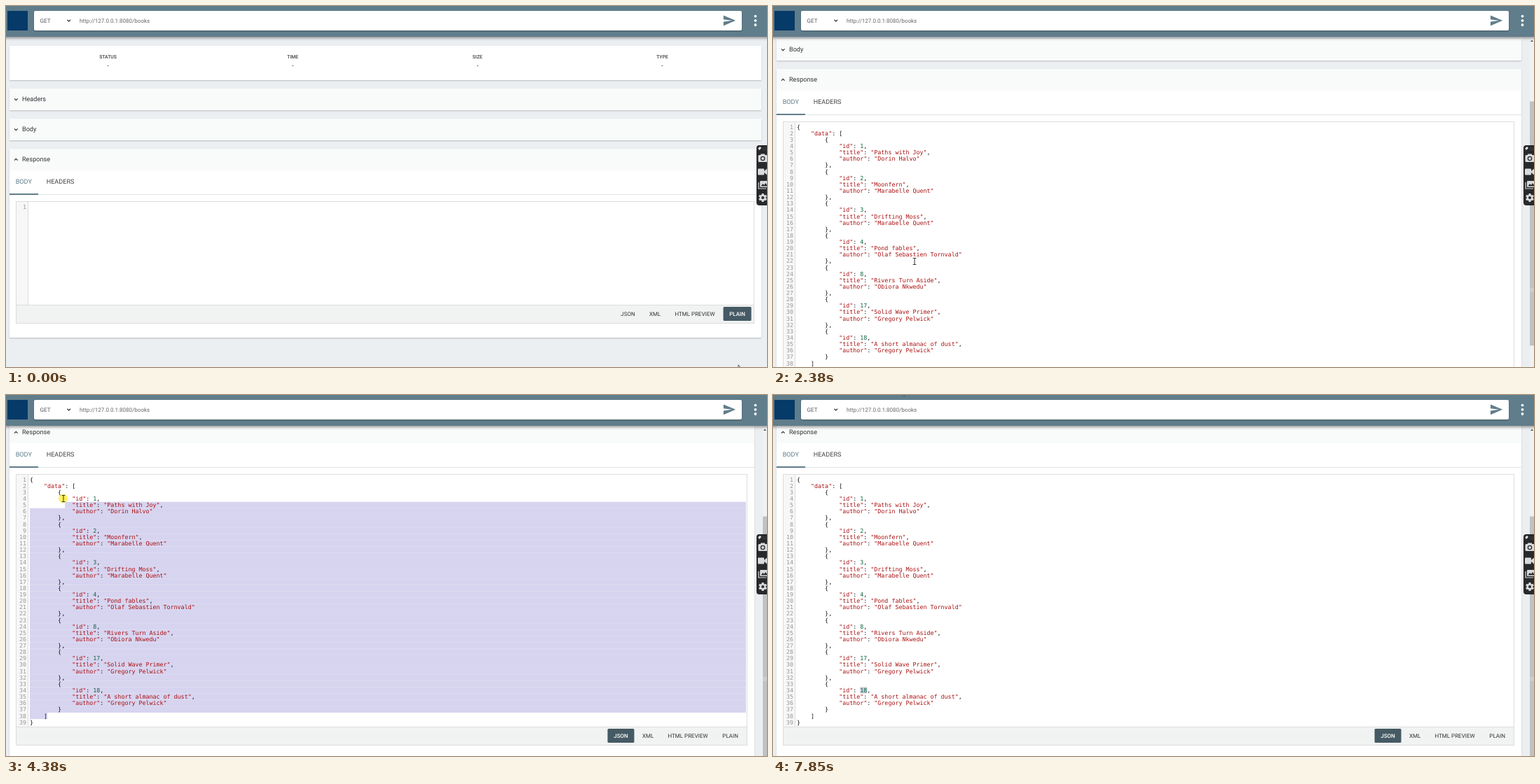
An HTML page with a canvas that plays this animation: 1086x516 px, repeating every 8 s.

```html
<!DOCTYPE html>
<html lang="en">
<head>
<meta charset="utf-8">
<title>REST client</title>
<style>
html, body { margin: 0; width: 100%; height: 100%; overflow: hidden; background: #eceff1; }
canvas { display: block; width: 1086px; height: 516px; }
</style>
</head>
<body>
<canvas id="stage" width="1086" height="516"></canvas>
<script>
const ctx = document.getElementById('stage').getContext('2d');
const LOOP = 8000;
const UI = 'Roboto, sans-serif';
const MONO = '8.33px "DejaVu Sans Mono", monospace';
const SLATE = '#607d8b';
const CODE_X = 34, CHAR = 5.015, ROW = 9.13, ROW_Y = 286.7;

const book = (id, title, author) => ({ id, title, author });
const lines = JSON.stringify({ data: [
  book(1, 'Paths with Joy', 'Dorin Halvo'),
  book(2, 'Moonfern', 'Marabelle Quent'),
  book(3, 'Drifting Moss', 'Marabelle Quent'),
  book(4, 'Pond fables', 'Olaf Sebastien Tornvald'),
  book(8, 'Rivers Turn Aside', 'Obiora Nkwedu'),
  book(17, 'Solid Wave Primer', 'Gregory Pelwick'),
  book(18, 'A short almanac of dust', 'Gregory Pelwick')
] }, null, 4).split('\n');

// The picture only changes at these moments
const ticks = [0, 190, 410, 630, 850, 1070, 1310, 1520, 1740, 1960, 2180,
  2380, 2600, 2820, 3040, 3260, 3480, 3690, 3910, 4130, 4380, 4580, 4800,
  5020, 5230, 5450, 5680, 5880, 6100, 6320, 6540, 7220, 7440, 7660, 7850];

// time, x, y
const path = [[0, 1045, 513], [190, 1000, 460], [630, 520, 120], [850, 286, 15],
  [1070, 680, 16], [1310, 1034, 14], [1520, 830, 67], [2380, 202, 365],
  [3260, 82, 453], [3690, 78, 454], [4380, 82, 148], [4580, 60, 131],
  [4800, 41, 122], [5450, 125, 426], [5680, 126, 421], [6100, 128, 422],
  [6540, 128, 422], [7220, 136, 370], [7850, 183, -9]];

const scrollKeys = [[1960, 0], [2380, 114], [2600, 166]];

function along(keys, t) {
  if (t <= keys[0][0]) return keys[0].slice(1);
  for (let i = 1; i < keys.length; i++) {
    const a = keys[i - 1], b = keys[i];
    if (t <= b[0]) {
      const k = (t - a[0]) / (b[0] - a[0]);
      return a.slice(1).map((v, j) => v + (b[j + 1] - v) * k);
    }
  }
  return keys[keys.length - 1].slice(1);
}

function rect(x, y, w, h, fill) {
  ctx.fillStyle = fill;
  ctx.fillRect(x, y, w, h);
}

function round(x, y, w, h, r, fill) {
  ctx.fillStyle = fill;
  ctx.beginPath();
  ctx.roundRect(x, y, w, h, r);
  ctx.fill();
}

function disc(x, y, r, fill) {
  ctx.fillStyle = fill;
  ctx.beginPath();
  ctx.arc(x, y, r, 0, Math.PI * 2);
  ctx.fill();
}

function shadow(blur, dy, alpha, draw) {
  ctx.save();
  ctx.shadowColor = `rgba(0,0,0,${alpha})`;
  ctx.shadowBlur = blur;
  ctx.shadowOffsetY = dy;
  draw();
  ctx.restore();
}

function shape(d, fill, x = 0, y = 0, s = 1, line) {
  ctx.save();
  ctx.translate(x, y);
  ctx.scale(s, s);
  const p = new Path2D(d);
  ctx.fillStyle = fill;
  ctx.fill(p);
  if (line) {
    ctx.strokeStyle = line;
    ctx.lineWidth = 0.8;
    ctx.stroke(p);
  }
  ctx.restore();
}

// y is the middle of the capitals
function text(s, x, y, size, color, { weight = 400, align = 'left', gap = 0 } = {}) {
  ctx.font = `${weight} ${size}px ${UI}`;
  ctx.letterSpacing = gap + 'px';
  ctx.textAlign = align;
  ctx.fillStyle = color;
  ctx.fillText(s, x, y + size * 0.355);
  ctx.letterSpacing = '0px';
}

function chevron(x, y, dir) {
  ctx.strokeStyle = '#2b2f31';
  ctx.lineWidth = 1.2;
  ctx.beginPath();
  ctx.moveTo(x - 2.3, y - dir * 1.1);
  ctx.lineTo(x, y + dir * 1.1);
  ctx.lineTo(x + 2.3, y - dir * 1.1);
  ctx.stroke();
}

function card(y, h, right) {
  shadow(2, 1, 0.22, () => round(5, y, right - 5, h, 1, '#fff'));
}

function panelHead(label, y, right, dir) {
  rect(5, y, right - 5, 31, '#f9fafa');
  chevron(14.3, y + 15.5, dir);
  text(label, 23, y + 15.2, 9.12, '#2f3336');
}

function summary(right, loaded) {
  card(57, 49, right);
  const values = loaded
    ? ['200 OK', '6.00 ms', '446 bytes', 'application/json; charset=utf-8']
    : ['-', '-', '-', '-'];
  ['STATUS', 'TIME', 'SIZE', 'TYPE'].forEach((label, i) => {
    const x = 13.7 + (right - 23.3) * (i + 0.5) / 4;
    text(label, x, 73, 6.85, '#3a3e40', { weight: 500, align: 'center' });
    text(values[i], x, 85, 9.12, '#222', { align: 'center', gap: loaded ? -0.45 : 0 });
  });
}

const rowTop = n => ROW_Y + (n - 1) * ROW - ROW / 2;

function select(from, to, right, fill) {
  for (let n = from[0]; n <= to[0]; n++) {
    const x = CODE_X + (n === from[0] ? from[1] : 0) * CHAR;
    const end = n === to[0] ? CODE_X + to[1] * CHAR : right;
    rect(x, rowTop(n), end - x, ROW + 0.1, fill);
  }
}

function code(loaded) {
  ctx.font = MONO;
  const rows = loaded ? lines : [''];
  rows.forEach((line, i) => {
    const y = ROW_Y + i * ROW + 3;
    ctx.textAlign = 'right';
    ctx.fillStyle = '#999';
    ctx.fillText(i + 1, 29, y);
    ctx.textAlign = 'left';
    for (const m of line.matchAll(/"[^"]*"|\d+|[^\s"\d]+/g)) {
      const c = m[0][0];
      ctx.fillStyle = c === '"' ? '#a11' : /\d/.test(c) ? '#164' : '#111';
      ctx.fillText(m[0], CODE_X + m.index * CHAR, y);
    }
  });
}

function modes(right, y, active) {
  const items = [['JSON', 180.5, 38], ['XML', 141.8, 32], ['HTML PREVIEW', 85, 76], ['PLAIN', 24.4, 40]];
  for (const [label, back, w] of items) {
    const x = right - back, on = label === active;
    if (on) round(x - w / 2, y + 3, w, 20, 1.5, '#455a64');
    text(label, x, y + 13, 8, on ? '#fff' : '#333', { weight: on ? 500 : 400, align: 'center' });
  }
}

function selection(t, px, py, scroll, right) {
  if (t >= 3910 && t < 5680) {
    let from = [1, 0];
    if (t < 4800) {
      const n = Math.floor((py + scroll - rowTop(1)) / ROW) + 2;
      from = [n, Math.round((px - CODE_X) / CHAR)];
    }
    select(from, [38, 5], right - 2, '#d7d4f0');
  }
  if (t >= 6100) select([34, 18], [34, 20], right, '#cbcedb');
}

function caret(n, col) {
  rect(Math.round(CODE_X + col * CHAR), rowTop(n), 1, ROW, '#111');
}

function response(t, px, py, scroll, right, loaded) {
  const foot = loaded ? 640 : 427, edge = right - 10;
  card(204, foot + 47 - 204, right);
  panelHead('Response', 204, right, -1);
  text('BODY', 13.7, 251, 9.1, SLATE);
  text('HEADERS', 57.7, 251, 9.1, '#444');
  rect(5, 269, right - 5, 1, '#e0e2e3');
  rect(5, 268, 41, 2, SLATE);

  rect(14, 279, edge - 14, foot + 27 - 279, '#ddd');
  rect(15, 280, edge - 16, foot - 280, '#fff');
  rect(15, 280, 16, foot - 280, '#f7f7f7');
  rect(31, 280, 1, foot - 280, '#ddd');
  rect(15, foot + 1, edge - 16, 25, '#f1f2f2');
  modes(edge, foot, loaded ? 'JSON' : 'PLAIN');

  selection(t, px, py, scroll, edge);
  code(loaded);
  if (t === 3690) caret(38, 5);
  if (t === 5680 || t === 5880) caret(34, 18);
}

function scrollbar(scroll) {
  rect(1080, 44, 6, 472, '#f1f1f1');
  shape('M-2 1L0-1.4L2 1Z', '#555', 1083, 50);
  rect(1080, 55 + scroll * 0.714, 6, 349, '#c1c1c1');
  if (scroll > 0) rect(1080, 403, 6, 6, '#cdcdcd');
}

function topBar() {
  shadow(4, 1.5, 0.4, () => rect(-6, -6, 1098, 50, SLATE));
  rect(2, 7, 29, 28, '#063a68');
  shadow(2, 1, 0.3, () => round(40, 7, 1010, 28, 2, '#fff'));
  text('GET', 48.6, 20.8, 8, '#555');
  chevron(89.7, 20.8, 1);
  text('http://127.0.0.1:8080/books', 105, 20.8, 8, '#666');
  shape('M2 21L23 12L2 3V10L17 12L2 14Z', SLATE, 1022.3, 11, 0.82);
  for (const y of [14.6, 20.8, 27]) disc(1069.5, y, 1.9, '#fff');
}

function recorder() {
  round(1071, 199, 20, 86, 4, '#27292b');
  shape('M-2 3L-.5 .7L-2-.6L-1-1.2L1-3L3-1L1.4 .6L.8 2L-.2 1Z', '#eee', 1075, 204);
  for (let i = 0; i < 6; i++) rect(1080 + i % 3 * 2, 202.5 + (i > 2) * 2.5, 1, 1, '#555');

  const pale = '#d8dadb', dark = '#27292b';
  round(1073.5, 213, 13, 10, 1.5, pale);
  rect(1077, 211.5, 6, 2, pale);
  disc(1080, 218, 3.3, dark);
  disc(1080, 218, 2, pale);

  round(1073, 232.5, 9, 9, 1, pale);
  shape('M1082 236L1086 232.5V241.5L1082 238Z', pale);

  ctx.strokeStyle = pale;
  ctx.lineWidth = 1.2;
  ctx.beginPath();
  ctx.moveTo(1074, 252);
  ctx.lineTo(1074, 261);
  ctx.lineTo(1085, 261);
  ctx.stroke();
  round(1076, 250, 12, 9, 1, pale);
  shape('M1077.5 257.5L1080 254L1082 256L1084 253L1087 257.5Z', dark);

  for (let i = 0; i < 6; i++) {
    ctx.save();
    ctx.translate(1080, 274);
    ctx.rotate(i * Math.PI / 3);
    rect(-1.5, -6, 3, 4, pale);
    ctx.restore();
  }
  disc(1080, 274, 4.5, pale);
  disc(1080, 274, 2, dark);
}

function pointer(t, x, y, scroll, loaded) {
  const held = t === 1310 || (t >= 3690 && t <= 4800) || t === 5680 || t === 6100;
  if (held) disc(x - 0.5, y, 6.5, 'rgba(255,232,0,.62)');
  const inUrl = x > 103 && x < 1015 && y > 7 && y < 35;
  const top = Math.max(46, 280 - scroll), bottom = (loaded ? 640 : 427) - scroll;
  const inCode = x > 32 && x < 1058 && y > top && y < bottom;
  if (inUrl || inCode) {
    ctx.strokeStyle = '#333';
    ctx.lineWidth = 1;
    ctx.beginPath();
    for (const dy of [-4.5, 4.5]) {
      ctx.moveTo(x - 2.3, y + dy);
      ctx.lineTo(x + 2.3, y + dy);
    }
    ctx.moveTo(x, y - 4.5);
    ctx.lineTo(x, y + 4.5);
    ctx.stroke();
  } else {
    shape('M0 0V9.2L2.1 7.3L3.6 10.7L5.1 10L3.7 6.8H6.6Z', '#fff', x, y, 1, '#222');
  }
}

function draw(now) {
  const time = now % LOOP;
  const t = ticks.reduce((last, v) => v <= time + 0.5 ? v : last, 0);
  const [x, y] = along(path, t);
  const scroll = Math.round(along(scrollKeys, t)[0]);
  const loaded = t >= 1310;
  const right = loaded ? 1068 : 1078;

  ctx.textRendering = 'geometricPrecision';
  rect(0, 0, 1086, 516, '#eceff1');
  ctx.save();
  ctx.translate(0, -scroll);
  summary(right, loaded);
  card(118, 31, right);
  panelHead('Headers', 118, right, 1);
  card(161, 31, right);
  panelHead('Body', 161, right, 1);
  response(t, x, y, scroll, right, loaded);
  ctx.restore();

  if (loaded) scrollbar(scroll);
  topBar();
  recorder();
  pointer(t, x, y, scroll, loaded);
}

const start = performance.now();
function tick() {
  draw(performance.now() - start);
  requestAnimationFrame(tick);
}
tick();
</script>
</body>
</html>
```
